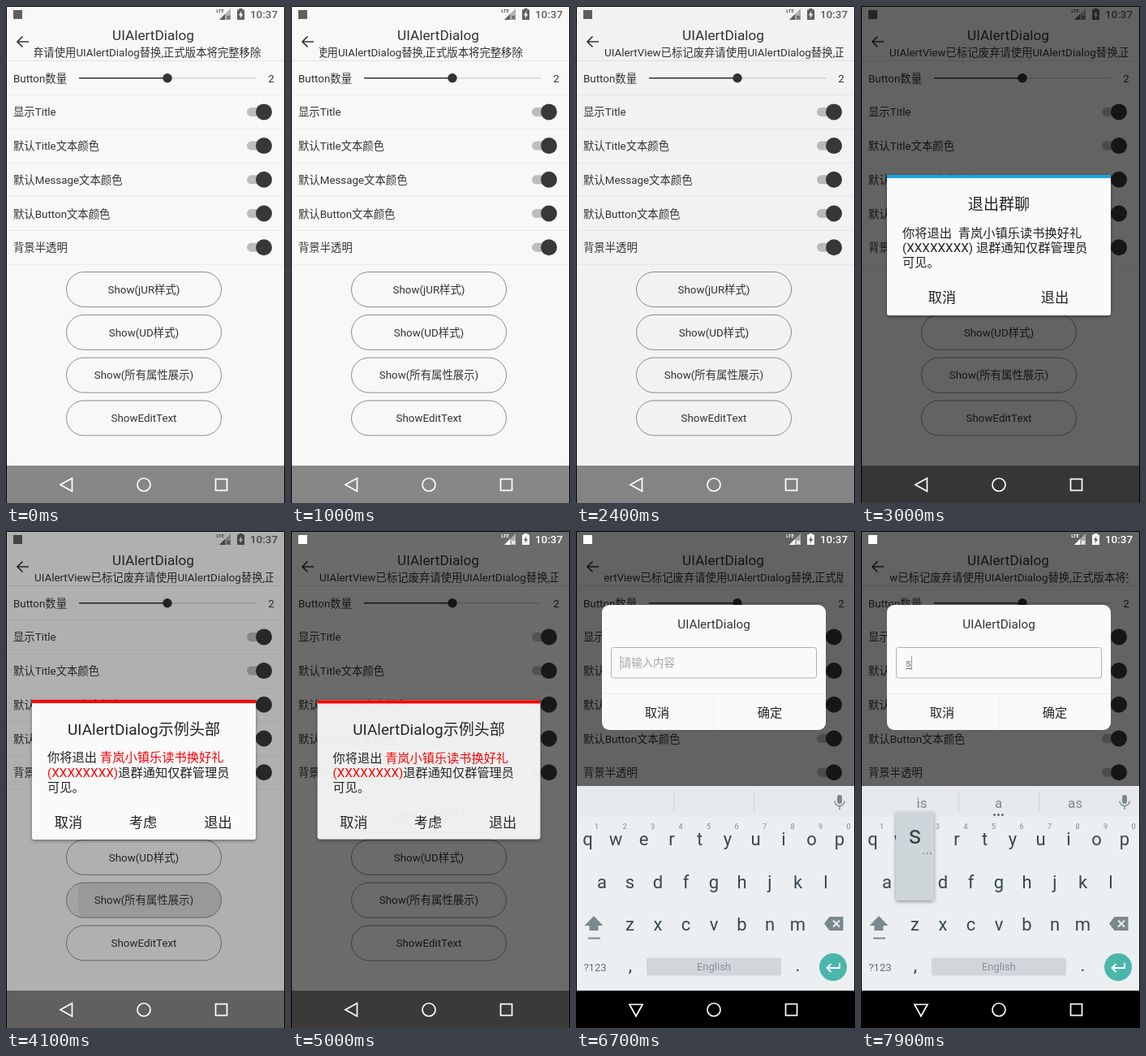
An HTML page for the animation above (8000 ms loop, 344 px wide and 612 px high).

```html
<!DOCTYPE html>
<html lang="zh-CN">
<head>
<meta charset="utf-8">
<style>
html, body { margin: 0; width: 100%; height: 100%; overflow: hidden; background: #000; }
svg { display: block; width: 344px; height: 612px; }
text { font-family: Roboto, "Noto Sans CJK SC", "Noto Sans CJK", sans-serif; white-space: pre; }
</style>
</head>
<body>
<svg id="stage" viewBox="0 0 344 612" xmlns="http://www.w3.org/2000/svg"></svg>
<script>
const LOOP = 8000, SMALL = 13.37, BODY = 15.28;
const INK = '#333', PAPER = '#f8f8f8';

// Markup helpers
const text = (x, y, s, size = SMALL, fill = INK, more = '') =>
  `<text x="${x}" y="${y}" font-size="${size}" fill="${fill}" ${more}>${s}</text>`;
const mid = (x, y, s, size, fill, more = '') =>
  text(x, y, s, size, fill, 'text-anchor="middle" ' + more);
const rect = (x, y, w, h, fill, more = '') =>
  `<rect x="${x}" y="${y}" width="${w}" height="${h}" fill="${fill}" ${more}/>`;
const circle = (x, y, r, fill, more = '') =>
  `<circle cx="${x}" cy="${y}" r="${r}" fill="${fill}" ${more}/>`;
const path = (d, fill, more = '') => `<path d="${d}" fill="${fill}" ${more}/>`;
const line = (d, color, w = 1) => path(d, 'none', `stroke="${color}" stroke-width="${w}"`);
const group = (id, body, more = '') => `<g id="${id}" ${more}>${body}</g>`;

// Page
const rows = ['Button数量', '显示Title', '默认Title文本颜色', '默认Message文本颜色',
  '默认Button文本颜色', '背景半透明'];
const buttons = ['Show(jUR样式)', 'Show(UD样式)', 'Show(所有属性展示)', 'ShowEditText'];

const toggle = y => rect(297, y - 5.5, 26, 11, '#bdbdbd', 'rx="5.5"') + circle(318, y, 10, '#383838');

const row = (label, i) => {
  const y = 88.7 + i * 41.7;
  return text(9, y + 5, label) + (i ? toggle(y) : '') +
    rect(1, Math.round(y + 20.5), 342, 1, '#ebebeb');
};

const pill = (label, i) => {
  const y = 327.5 + i * 52.8;
  const shape = `x="74.5" y="${y}" width="191" height="43" rx="21.5"`;
  return `<clipPath id="pill${i}"><rect ${shape}/></clipPath>
    <g id="ripple${i}" clip-path="url(#pill${i})">
      <rect ${shape} fill-opacity=".07"/>
      <circle id="wave${i}" cx="184" cy="${y + 21}" fill-opacity=".07"/>
    </g>
    <rect ${shape} fill="none" stroke="#8c8c8c"/>` + mid(170, y + 26.3, label);
};

const page = rect(0, 0, 344, 612, PAPER) +
  line('M28 44H14M20.5 37.5L14 44L20.5 50.5', INK, 1.7) +
  mid(181.5, 42, 'UIAlertDialog', 17.2) +
  `<clipPath id="strip"><rect x="35" y="47" width="294.5" height="20"/></clipPath>
   <g clip-path="url(#strip)">` +
  text(35, 61.5, 'UIAlertView已标记废弃请使用UIAlertDialog替换,正式版本将完整移除', SMALL, INK, 'id="marquee"') + '</g>' +
  rect(1, 67, 342, 1, '#e2e2e2') +
  rows.map(row).join('') +
  rect(90, 88, 109, 1.5, INK) + rect(199, 88, 109, 1.5, '#d4d4d4') + circle(199, 88.7, 5.7, INK) +
  mid(327, 93.7, '2') +
  buttons.map(pill).join('') +
  rect(0, 566, 344, 46, '#878787');

// Dialogs
const choices = (xs, labels, y, size) => labels.map((s, i) => mid(xs[i], y, s, size, '#222')).join('');

const card = rect(32, 217, 276, 154, '#fafafa', 'rx="9"') +
  mid(170, 245.5, 'UIAlertDialog', BODY) +
  rect(32, 326, 276, 1, '#eee') + rect(169.5, 327, 1, 44, '#f2f2f2');

const update = card + text(43, 285.3, '1、本次更新修复多个重大BUG', BODY) +
  text(43, 303.3, '2、新增用户反馈接口', BODY) +
  choices([100, 239], ['否定', '肯定'], 354.8, BODY);

const sheet = (bar, title, h) =>
  rect(32, 208, 276, h, '#fafafa', 'rx="3" filter="url(#shadow)"') +
  rect(32, 208, 276, 4, bar) + mid(170, 251, title, 19.1, '#222');

const GROUP_NAME = '青岚小镇乐读书换好礼';
const leave = (gap, color, tail) =>
  text(51, 284.5, `你将退出${gap}<tspan fill="${color}">${GROUP_NAME}</tspan>`, BODY, '#222') +
  text(51, 302.7, `<tspan fill="${color}">(XXXXXXXX)</tspan>${tail}退群通知仅群管理员`, BODY, '#222') +
  text(51, 320.9, '可见。', BODY, '#222');

const quit = sheet('#1ba5e1', '退出群聊', 173) + leave('  ', '#222', ' ') +
  choices([100, 239], ['取消', '退出'], 365, 17.2);

const all = sheet('#f00', 'UIAlertDialog示例头部', 172) + leave(' ', '#f00', '') +
  choices([77, 169, 261.5], ['取消', '考虑', '退出'], 365, 17.2);

const edit = card +
  rect(43.5, 269.5, 253, 37.5, '#fafafa', 'rx="3" stroke="#b0b0b0"') +
  text(55, 292.7, '请输入内容', SMALL, '#a6a6a6', 'id="hint"') +
  group('typed', text(55, 292.7, 's', SMALL, '#777') + rect(55, 295, 7, 1, '#777')) +
  rect(54.5, 280, 1, 17, '#999', 'id="cursor"') +
  choices([100, 239], ['取消', '确定'], 354.8, BODY);

const dialogs = [
  { body: update, start: 1247, end: 2190 },
  { body: quit, start: 2747, end: 3390 },
  { body: all, start: 3947, end: 4990 },
  { body: edit, start: 5647, end: Infinity },
];

// Keyboard
const KEY = '#37474f', SOFT = '#7b888e';
const keys = (letters, x, y) =>
  [...letters].map((c, i) => mid(x + i * 34.5, y, c, 22, KEY)).join('');

const keyboard = rect(1, 314, 342, 252, '#eceff1') + rect(1, 314, 342, 38, '#e6eaec') +
  rect(120, 322, 1, 24, '#cfd5d8') + rect(219, 322, 1, 24, '#cfd5d8') +
  rect(322, 325, 6, 11, SOFT, 'rx="3"') +
  line('M319 332.5a6 6 0 0 0 12 0M325 338.5V343', SOFT, 1.5) +
  group('suggest', mid(75, 341, 'is', 17, SOFT) + mid(169.5, 341, 'a', 17, SOFT) +
    mid(264, 341, 'as', 17, SOFT) +
    [164.5, 169.5, 174.5].map(x => circle(x, 349.5, 1.3, KEY)).join('')) +
  keys('qwertyuiop', 14.5, 386.5) + keys('asdfghjkl', 32, 439.5) + keys('zxcvbnm', 66.5, 491.5) +
  [...'1234567890'].map((c, i) => mid(25.5 + i * 34.5, 367, c, 9, SOFT)).join('') +
  path('M22 474L33.5 486H27.5V492H16.5V486H10.5Z', SOFT) + rect(15, 500.5, 15, 2, SOFT) +
  path('M306 483.5L312.5 475H329.5V492H312.5Z', SOFT) +
  line('M317 479.5l8 8m0 -8l-8 8', '#eceff1', 1.8) +
  mid(23.5, 541.5, '?123', 13, '#607078') + mid(67, 542, ',', 22, KEY) + mid(273.5, 542, '.', 22, KEY) +
  rect(87, 525.5, 166, 22, '#d0d6d9', 'rx="2"') + mid(170, 541, 'English', 13, '#85929a') +
  circle(317, 537, 17, '#4db6ac') +
  line('M325 532V538H310M314.5 533L309.5 538L314.5 543', '#fff', 2) +
  group('popup', rect(43, 346, 47, 109, '#cfd6d9', 'rx="2" filter="url(#shadow)"') +
    mid(66.5, 384.5, 's', 31, KEY) +
    [77, 81.5, 86].map(x => circle(x, 397, 1, SOFT)).join(''));

// System bars
const status = rect(9, 5, 11, 11, 'currentColor') +
  mid(264, 8, 'LTE', 6, 'currentColor', 'font-weight="700"') +
  path('M277 3V17H263Z', 'currentColor', 'opacity=".45"') +
  path('M270 10V17H263Z', 'currentColor') +
  line('M272 12l4.5 4.5m0 -4.5l-4.5 4.5', 'currentColor', 1.3) +
  path('M287.5 3h4v1.5h2.5V17h-9V4.5h2.5Z', 'currentColor') +
  path('M290.5 6L286.8 11.5H289L288.5 15.5L292.2 10H290Z', PAPER, 'id="bolt"') +
  text(301, 15.2, '10:37', 13.4, 'currentColor', 'font-weight="500"');

const nav = `<g fill="none" stroke="#fff" stroke-width="1.7">
  <path id="back"/><circle cx="170" cy="589.5" r="8"/>
  <rect x="258.5" y="582.5" width="14" height="14"/></g>`;

document.getElementById('stage').innerHTML =
  `<filter id="shadow" x="-10%" y="-10%" width="120%" height="125%">
    <feDropShadow dx="0" dy="1.5" stdDeviation="2" flood-opacity=".4"/></filter>
  <clipPath id="screen"><rect x="0" y="0" width="344" height="566"/></clipPath>` +
  page + rect(0, 0, 344, 612, '#000', 'id="dim"') + group('status', status) +
  dialogs.map((d, i) => group('dialog' + i, d.body)).join('') +
  `<g clip-path="url(#screen)">${group('keyboard', keyboard)}</g>` +
  rect(0, 566, 344, 46, '#000', 'id="navShade"') + nav +
  line('M.5 612V.5H343.5V612', '#000');

// Motion
const el = {};
document.querySelectorAll('[id]').forEach(e => el[e.id] = e);
const set = (id, name, value) => el[id].setAttribute(name, value);
const show = (id, on) => set(id, 'visibility', on ? 'visible' : 'hidden');
const ramp = (t, from, length) => Math.min(1, Math.max(0, (t - from) / length));
const easeOut = (x, power) => 1 - (1 - x) ** power;

const EDIT = dialogs[3].start, TYPED = 7880;

function scrollAt(t) {
  if (t < dialogs[0].start) return 125 + t * .0285;
  return Math.max(0, t - 5820) * .0285;
}

function draw(t) {
  let dim = 0, whiteIcons = false;
  const lift = 126 * easeOut(ramp(t, 6020, 250), 3);

  dialogs.forEach(({ start, end }, i) => {
    const leaving = ramp(t, end, 150);
    const alpha = easeOut(ramp(t, start, 150), 3) * (1 - leaving);
    const scale = .9 + .1 * easeOut(ramp(t, start, 220), 5) - .07 * leaving;
    const dy = i === 3 ? lift : 0;
    set('dialog' + i, 'opacity', alpha);
    set('dialog' + i, 'transform', `translate(170 ${294 - dy}) scale(${scale}) translate(-170 -294)`);
    show('dialog' + i, alpha > 0);
    dim += .6 * ramp(t, start, 250) ** 1.5 * (1 - ramp(t, end, 220));
    whiteIcons ||= t > start + 300 && t < end + 150;

    set('ripple' + i, 'opacity', ramp(t, start - 110, 60) * (1 - ramp(t, start + 155, 95)));
    set('wave' + i, 'r', Math.max(0, 40 + .36 * (t - start)));
  });

  set('dim', 'opacity', dim);
  const shade = v => `rgb(${Array(3).fill(Math.round(v * (1 - dim)))})`;
  set('status', 'color', whiteIcons ? '#fff' : shade(96));
  set('bolt', 'fill', shade(248));
  set('marquee', 'transform', `translate(${-scrollAt(t)})`);

  const k = easeOut(ramp(t, 5960, 250), 3);
  set('keyboard', 'opacity', k);
  set('keyboard', 'transform', `translate(0 ${50 * (1 - k)})`);
  set('navShade', 'opacity', k);
  set('back', 'd', t >= EDIT ? 'M66 583H82L74 597.5Z' : 'M81.5 581.5V597.5L67 589.5Z');

  const typed = t >= TYPED;
  show('popup', t >= 7780);
  for (const id of ['typed', 'suggest']) set(id, 'display', typed ? 'inline' : 'none');
  set('hint', 'display', typed ? 'none' : 'inline');
  set('cursor', 'x', typed ? 62 : 54.5);
  set('cursor', 'opacity', typed || (t - EDIT) % 1000 < 500 ? 1 : 0);
}

function tick() {
  draw(performance.now() % LOOP);
  requestAnimationFrame(tick);
}
tick();
</script>
</body>
</html>
```
